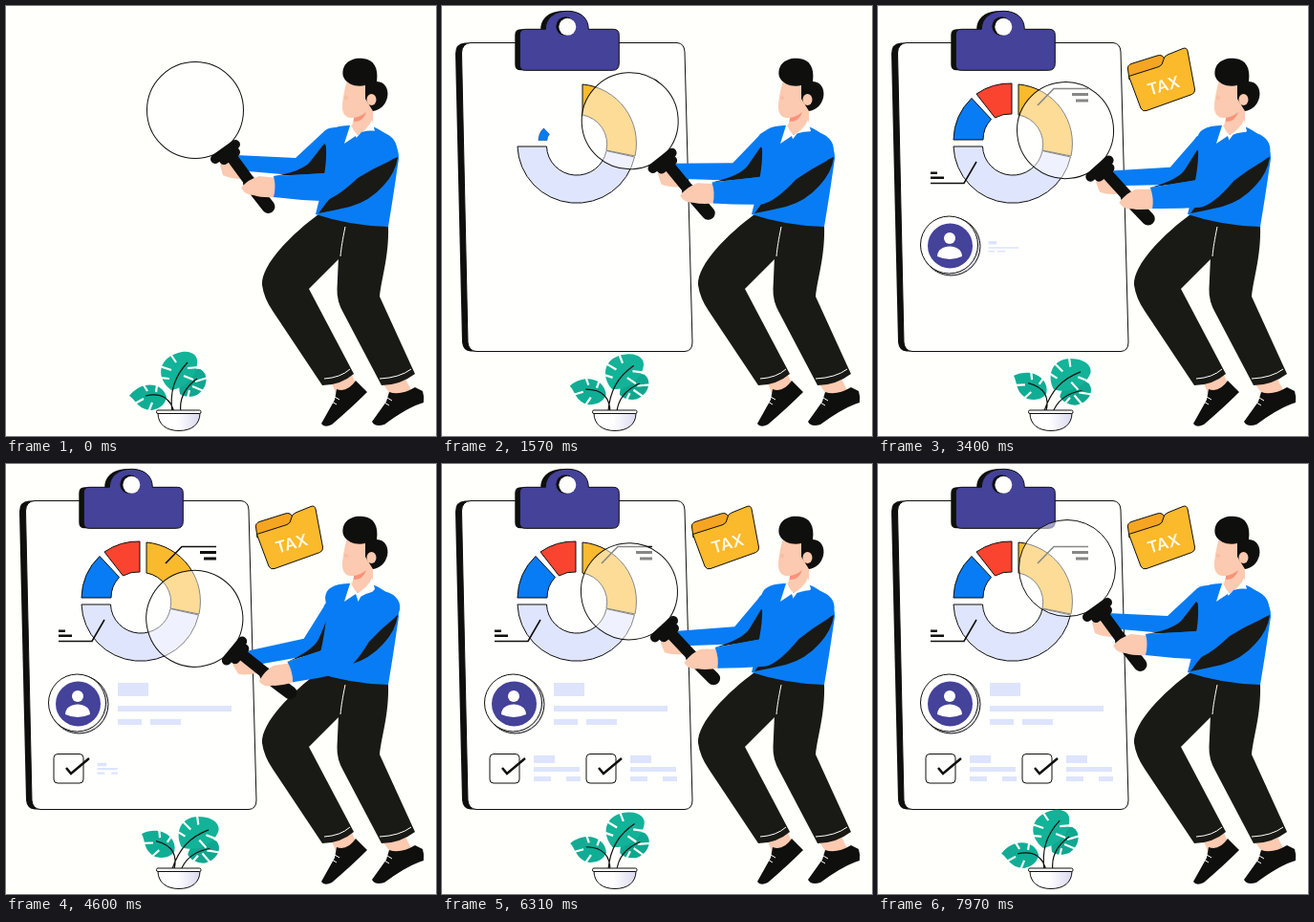
These frames come from a looping animation (450x450 px, 8 s). An HTML page:

```html
<!DOCTYPE html>
<html lang="en">
<head>
<meta charset="utf-8">
<style>
html, body { margin: 0; width: 100%; height: 100%; overflow: hidden; background: #fffffb; }
svg { display: block; width: 100vw; height: 100vh; }
.ink { fill: #0f0f0d; }
.dark { fill: #191915; }
.skin { fill: #fbcab0; }
.blue { fill: #087cf4; }
.line { fill: none; stroke: #0f0f0d; stroke-width: 1.6; }
.edge { stroke: #0f0f0d; stroke-width: 1; }
.paper { fill: #fffffd; }
.bar { fill: #dde4fc; }
.slit { fill: none; stroke: #fffffb; stroke-width: 2.2; }
.white { fill: none; stroke: #fff; stroke-width: 1; }
.grip { stroke: #0f0f0d; stroke-linecap: round; }
text { font: 600 17px Inter, sans-serif; fill: #fff9e6; text-anchor: middle; }
</style>
</head>
<body>
<svg viewBox="0 0 450 450">
  <defs>
    <path id="clip" d="M88 25H109C109 13 119 6 132 6S154 13 154 25H180q6 0 6 6V61q0 7-7 7H88q-6 0-6-6V31q0-6 6-6z"/>
    <g id="rows" class="bar">
      <path d="M96 305h22v8H96zM96 317h48v5H96zM96 327h18v5H96zM130 327h15v5h-15z"/>
    </g>
    <rect id="box" class="paper edge" x="50" y="303.500" width="31" height="30.500" rx="4"/>
    <linearGradient id="bowl"><stop offset=".45" stop-color="#fff"/><stop offset="1" stop-color="#d9d9ef"/></linearGradient>
  </defs>

  <g id="board">
    <path class="ink" d="M24 38.500H34L40 361.500H30Q22 361 21 352L14 50Q14 39 24 38.500z"/>
    <path class="paper edge" d="M30 38.500H246Q253.500 39 254 48L262 352Q262 361 254 361.500H36Q28 361 27 352L20.500 49Q21 39 30 38.500z"/>
    <g transform="translate(-.7 -.7)">
      <use href="#clip" x="-5" class="ink"/>
      <use href="#clip" fill="#444299" stroke="#0f0f0d"/>
      <circle class="ink" cx="130" cy="22" r="10"/>
      <circle class="paper" cx="132" cy="22.500" r="9"/>
    </g>
  </g>

  <g class="edge">
    <path id="pale" fill="#dfe5fd" d="M79 147A62 61.500 0 0 0 201.500 158L172 151.500A31.500 31 0 0 1 109.500 147z"/>
    <path id="gold" fill="#f9ba2e" d="M147 82A62 62 0 0 1 202 157L172 151A31 31 0 0 0 147 114z"/>
    <path id="azure" fill="#087cf4" d="M79 140A62 62 0 0 1 98 96.500L118.500 118.500A31 31 0 0 0 110 140z"/>
    <path id="red" fill="#fa4430" d="M103 92A62 62 0 0 1 140 81V113A31 31 0 0 0 122.500 117z"/>
  </g>

  <path id="leadR" class="line" pathLength="1" d="M167 104L184 86.500H220"/>
  <path id="leadL" class="line" pathLength="1" d="M103 163L90 185.500H55"/>
  <path id="noteR" class="ink" d="M203 91h17v3h-17zM207 97.500h13v3h-13z"/>
  <path id="noteL" class="ink" d="M55 173.500h7v2.500h-7zM55 178.500h14v2.500H55z"/>

  <g id="user">
    <circle cx="76.500" cy="251.500" r="30.500" fill="#e3e3ec" class="edge"/>
    <circle cx="74.500" cy="250" r="30" class="paper edge"/>
    <circle cx="75.500" cy="251" r="23.500" fill="#444299"/>
    <circle cx="75" cy="243" r="6" fill="#fff"/>
    <path d="M62 262C62 248 88 248 88 262Q75 268 62 262z" fill="#fff"/>
  </g>
  <path id="bars" class="bar" d="M117 229h32v14h-32zM117 253h119v6H117zM117 267h25v6h-25zM151 267h32v6h-32z"/>

  <use id="box1" href="#box"/>
  <use id="box2" href="#box" x="101"/>
  <path id="tick1" class="line" style="stroke-width:2.500" pathLength="1" d="M63 318l5 6L87 308"/>
  <path id="tick2" class="line" style="stroke-width:2.500" pathLength="1" d="M164 318l5 6L188 308"/>
  <use id="rows1" href="#rows"/>
  <use id="rows2" href="#rows" x="101"/>

  <g id="folder">
    <path class="edge" fill="#f5a521" d="M263 77L261.500 66Q261 62 265 60.500L292 52Q298 50 300 56L299 66z"/>
    <path class="edge" fill="#fbb92c" d="M262.500 73.500L294 63.500Q298 62 298.500 57Q299 52.500 303 51L319 44.500Q323 43 324 47L331.500 87Q332 91 328.500 92.500L281 109.500Q277 111 275 107z"/>
    <text transform="translate(300.500 89) rotate(-16)">TAX</text>
  </g>

  <g id="plant">
    <path fill="#0fa78f" d="M182 406C179 391 186 378 203 380C213 385 211 400 200 407C193 410 186 409 182 406z"/>
    <path class="slit" d="M211 389l-13 4M207 403l-12-5M190 410l2-8"/>
    <path fill="#12b398" d="M173 402C158 391 157 370 180 363C193 359 201 365 200 373C200 386 190 399 173 402z"/>
    <path class="slit" d="M161 377l12 4M161 389l10 1M172 364l6 9M202 378l-12 1M196 391l-10-4"/>
    <path fill="#10ad95" d="M168 409C164 394 142 391 129 408C135 411 138 423 153 423C162 421 167 416 168 409z"/>
    <path class="slit" d="M143 395l5 8M135 416l9-5M149 425l4-10M158 397l-1 7"/>
    <path class="line" style="stroke-width:1.200" d="M174 426C171 404 176 388 190 373M183 426C181 412 186 400 200 390M176 426C173 412 164 404 146 408"/>
  </g>
  <path class="edge" fill="url(#bowl)" d="M159 426H203C203 438 194 444.500 181 444.500S159 438 159 426z"/>
  <rect class="edge" fill="#fff" x="157.500" y="423" width="46.500" height="3.500" rx="1.500"/>

  <!-- far arm -->
  <g class="swing">
    <path class="blue" d="M240 156L303 159L331 133Q336 126 348 127L372 140L350 190L300 177L242 172z"/>
    <path class="dark" d="M333 144L319 162Q311 173 280 178L335 175L352 190L350 160z"/>
  </g>

  <!-- legs and shoes -->
  <path class="skin" d="M341 395L362 386L367 397Q356 408 345 405zM395 396L418 390L424 402Q412 409 402 406z"/>
  <path class="ink" d="M346 401Q357 405 366 392L378 404Q362 420 341 438Q333 442 330 437L344 412z"/>
  <path class="ink" d="M401 404Q413 408 428 399L436 403Q438 409 437 415Q420 420 396 438Q386 441 383 435L398 414z"/>
  <path class="white" d="M344 409l5 3M341 414l5 3M399 410l5 3M396 415l5 3"/>
  <path class="dark" d="M327 218C300 238 267 270 268 292Q270 306 279 319L331 397Q350 397 364 385L317 296L350 263L385 229z"/>
  <path class="dark" d="M354 226L400 230C401 262 393 284 391 304L428 385Q412 397 393 397L353 321Q346 309 346.500 296L348 262z"/>
  <path class="white" d="M355 231C352 246 351 252 350 262M333 390Q350 389 360 380M391 390Q412 389 424 380"/>

  <!-- torso -->
  <path class="blue" d="M358 125C342 126 335 130 334 140C337 158 334 180 324 218Q360 230 400 231C404 208 408 180 411 160C412 145 401 133 383 126z"/>
  <path class="dark" d="M327 217Q343 193 366 179Q390 166 410 158Q408 174 395 188Q381 204 360 210Q343 214 327 217z"/>

  <!-- head -->
  <path class="skin" d="M357 78C354 88 352 99 352 106C352 114 357 118 364 117L361 130Q369 142 384 123L384 108L390 98L376 80z"/>
  <path fill="#f8937a" d="M364 117Q371 116 377 111Q374 121 364 121z"/>
  <path class="ink" d="M353 74C350 61 361 53 374 55C385 56 390 65 388 79C397 79 401 88 399 96C397 104 391 109 384 110L376 97L376 83C368 85 357 83 353 74z"/>
  <ellipse class="skin" cx="382.500" cy="98" rx="5" ry="6"/>
  <circle cx="356" cy="96" r="2" fill="#f9bda4"/>
  <path fill="#fff" d="M361 122L354 144L366 136L370 148L386 131L383 119Q379 129 368 135Q362 130 361 122z"/>

  <!-- near arm and lens -->
  <g class="swing">
    <path class="skin" d="M224 166Q232 160 242 164L247 181Q235 181 227 177z"/>
    <circle class="edge" cx="198" cy="109" r="50.500" fill="#fff" fill-opacity=".5"/>
    <g class="grip">
      <path stroke-width="10" d="M219 160L240 145M228 161L240 153"/>
      <path stroke-width="12" d="M236 158L258 188"/>
      <path stroke-width="14" d="M255 185L274.500 210"/>
    </g>
    <path class="skin" d="M246 190Q254 181 265 178L284 180L283 200Q268 201 259 198Q250 198 246 190z"/>
    <path class="blue" d="M280 178L333 175L372 132C397 126 411 140 409 152Q408 159 400 163Q384 170 368 180Q344 203 330 204Q305 203 280 200Q283 189 280 178z"/>
  </g>
</svg>
<script>
const LOOP = 8000, SWING = 2000, PEAK = 667, FALL = 1280;
const $ = id => document.getElementById(id);
const unit = x => Math.max(0, Math.min(1, x));
const smooth = u => u * u * (3 - 2 * u);
const back = u => u <= 0 ? 0 : 1 + 2.4 * (u - 1) ** 3 + 1.4 * (u - 1) ** 2;

// id, start, duration, fixed point of the scaling
const pops = [
  ['board', 30, 770, 141, 200],
  ['pale', 900, 350, 141, 176], ['gold', 1200, 350, 160, 140],
  ['azure', 1545, 350, 110, 141], ['red', 1760, 350, 130, 114],
  ['folder', 2040, 420, 297, 77],
  ['noteR', 2820, 250, 220, 96], ['noteL', 2820, 250, 55, 178],
  ['user', 2930, 380, 75, 251], ['bars', 3378, 350, 115, 252],
  ['box1', 3800, 350, 65, 319], ['rows1', 4560, 350, 95, 319],
  ['box2', 4870, 350, 166, 319], ['rows2', 5480, 350, 196, 319]
];
// id, start, duration of the stroke
const draws = [
  ['leadR', 2490, 360], ['leadL', 2490, 360],
  ['tick1', 4150, 300], ['tick2', 5180, 280]
];
const swingers = document.querySelectorAll('.swing');

function frame(now) {
  const t = now % LOOP;

  for (const [id, start, length, x, y] of pops) {
    const s = back(unit((t - start) / length));
    const el = $(id);
    el.style.visibility = s > 0 ? 'visible' : 'hidden';
    el.setAttribute('transform', `translate(${x} ${y}) scale(${s}) translate(${-x} ${-y})`);
  }
  for (const [id, start, length] of draws) {
    const p = unit((t - start) / length);
    $(id).style.visibility = p > 0 ? 'visible' : 'hidden';
    $(id).setAttribute('stroke-dasharray', `${p} 2`);
  }

  // quick dip, slow lift
  const s = t % SWING;
  const dip = s < PEAK ? smooth(s / PEAK) : 1 - smooth(unit((s - PEAK) / FALL));
  swingers.forEach(el => el.setAttribute('transform', `rotate(${-15.5 * dip} 397 138)`));

  const lean = 31 * (1 - Math.abs(1 - 2 * t / LOOP));
  $('plant').setAttribute('transform', `rotate(${lean} 180 425)`);
  requestAnimationFrame(frame);
}
frame(0);
</script>
</body>
</html>
```
